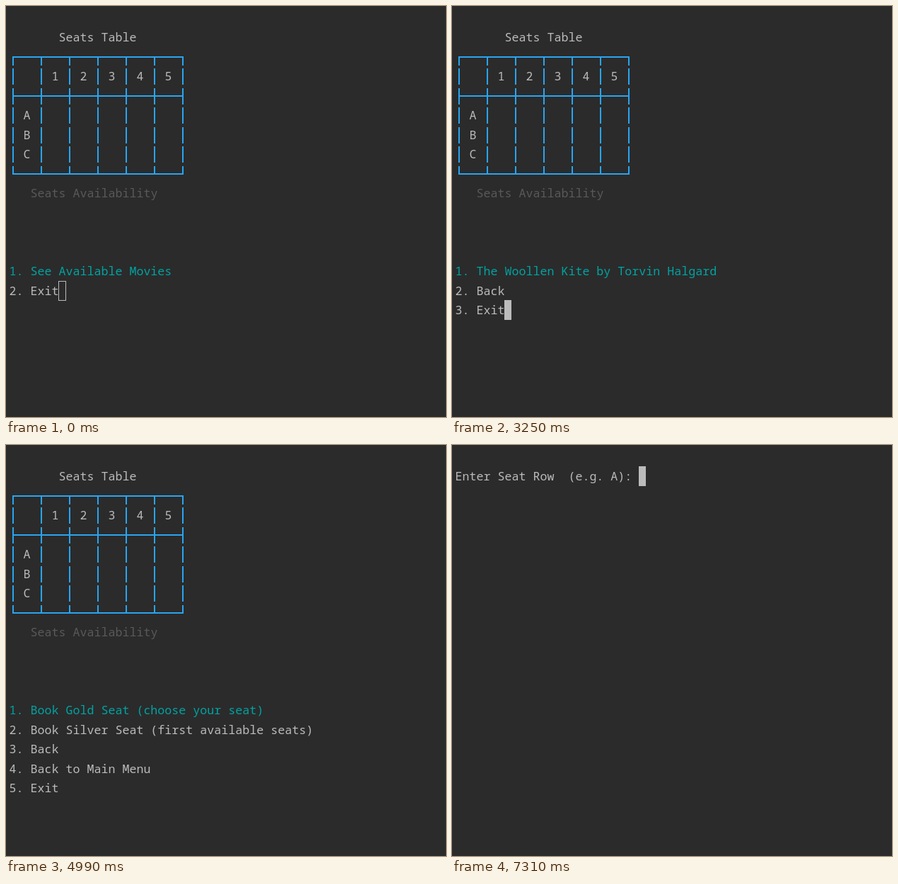
These frames come from a looping animation (622 px wide and 580 px high, 8 s). An HTML page:

```html
<!DOCTYPE html>
<html lang="en">
<head>
<meta charset="utf-8">
<title>Seat booking terminal</title>
<style>
  html, body { margin: 0; width: 100%; height: 100%; overflow: hidden; background: #2b2b2b; }
  svg { display: block; }
  text { font: 16.667px "Noto Sans Mono", "DejaVu Sans Mono", monospace; fill: #bbb; white-space: pre; }
  .active { fill: #00a3a3; }
  .dim { fill: #595959; }
  .grid { fill: none; stroke: #28a5f2; stroke-width: 2; }
  .cursor { fill: #bbb; }
  .hollow { fill: none; stroke: #bbb; }
</style>
</head>
<body>
<svg id="stage" width="622" height="580" viewBox="0 0 622 580"></svg>
<script>
const LOOP = 8000;
const LEFT = 4.5, TOP = 30.5, COL = 10, ROW = 27.5;
const MENU_ROW = 12;
const stage = document.getElementById("stage");

const colX = col => LEFT + col * COL;
const rowY = row => TOP + row * ROW;

function add(parent, tag, attrs, content = "") {
  const node = document.createElementNS("http://www.w3.org/2000/svg", tag);
  for (const key in attrs) node.setAttribute(key, attrs[key]);
  node.textContent = content;
  parent.append(node);
  return node;
}

function write(parent, col, row, content, look = "") {
  add(parent, "text", { x: colX(col), y: Math.round(rowY(row) + 19.5), class: look }, content);
}

function buildTable() {
  const group = add(stage, "g", {});
  write(group, 7, 0, "Seats Table");
  [..."12345"].forEach((n, i) => write(group, 6 + i * 4, 2, n));
  [..."ABC"].forEach((n, i) => write(group, 2, 4 + i, n));
  write(group, 3, 8, "Seats Availability", "dim");

  let d = "";
  for (let row = 1; row <= 7; row++) {
    const mid = Math.round(rowY(row) + 13.5);
    const from = row === 1 ? mid - 1 : mid - 11;
    const to = row === 7 ? mid + 1 : mid + 12;
    for (let x = 10; x <= 250; x += 40) d += `M${x} ${from}V${to}`;
    if ([1, 3, 7].includes(row)) d += `M9 ${mid}H251`;
  }
  add(group, "path", { class: "grid", d });
  return group;
}

function buildMenu(items, active) {
  const group = add(stage, "g", {});
  items.forEach((item, i) =>
    write(group, 0, MENU_ROW + i, `${i + 1}. ${item}`, i === active ? "active" : ""));
  return group;
}

const movies = ["The Woollen Kite by Torvin Halgard", "Back", "Exit"];
const table = buildTable();
const menus = {
  main: buildMenu(["See Available Movies", "Exit"], 0),
  movie: buildMenu(movies, 0),
  back: buildMenu(movies, 1),
  seats: buildMenu(["Book Gold Seat (choose your seat)",
    "Book Silver Seat (first available seats)", "Back", "Back to Main Menu", "Exit"], 0),
  prompt: add(stage, "g", {})
};
write(menus.prompt, 0, 0, "Enter Seat Row  (e.g. A):");

const cursor = add(stage, "rect", { class: "cursor", width: COL });
const hollow = add(stage, "rect", { class: "hollow", x: 74.5, y: 388.5, width: 10, height: 27 });

// Cursor cells as [column, row]
const home = [0, -1], afterMain = [7, 13], afterMovie = [7, 14],
  afterSeats = [7, 16], afterPrompt = [26, 0];

// Start time, screen, cursor cell
const steps = [
  [0, "main", "hollow"],
  [660, "main", afterMain],
  [1190, "main"],
  [1730, "main", afterMain],
  [2190, "blank"],
  [2260, "movie", afterMovie],
  [2720, "movie"],
  [3250, "movie", afterMovie],
  [3520, "blank", home],
  [3590, "back", afterMovie],
  [4000, "blank", home],
  [4050, "movie", afterMovie],
  [4380, "seats"],
  [4450, "seats", afterSeats],
  [4990, "seats"],
  [5520, "seats", afterSeats],
  [5980, "seats"],
  [6530, "seats", afterSeats],
  [7060, "seats"],
  [7310, "prompt", afterPrompt]
];

const show = (node, on) => { node.style.display = on ? "" : "none"; };

function render(time) {
  const [, screen, cell] = steps.findLast(step => step[0] <= time);
  for (const name in menus) show(menus[name], name === screen);
  show(table, screen !== "blank" && screen !== "prompt");
  show(hollow, cell === "hollow");
  const solid = Array.isArray(cell);
  show(cursor, solid);
  if (solid) {
    const top = Math.floor(rowY(cell[1]));
    cursor.setAttribute("x", Math.floor(colX(cell[0])));
    cursor.setAttribute("y", top);
    cursor.setAttribute("height", Math.floor(rowY(cell[1] + 1)) - top);
  }
}

const start = performance.now();
function tick() {
  render((performance.now() - start) % LOOP);
  requestAnimationFrame(tick);
}
tick();
</script>
</body>
</html>
```
